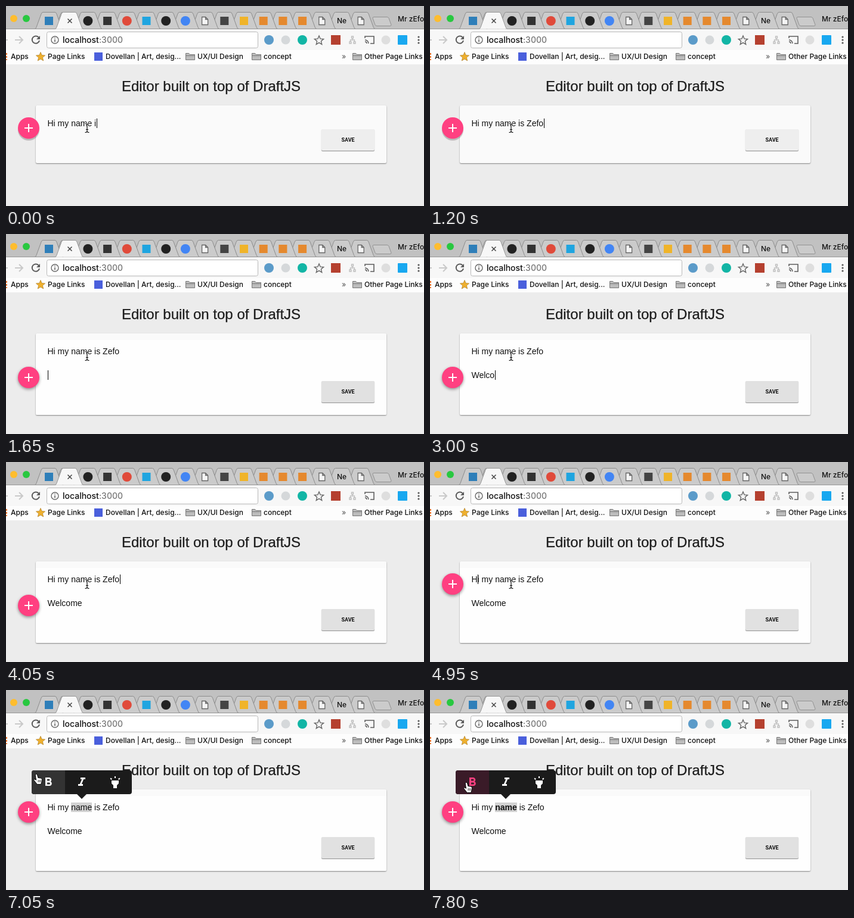
An HTML page that plays this animation: 701x336 px, repeating every 8000 ms.

```html
<!DOCTYPE html>
<html lang="en">
<head>
<meta charset="utf-8">
<title>Rich text editor demo</title>
<style>
  html, body { margin: 0; width: 100%; height: 100%; overflow: hidden; background: #ececec; }
  #stage { position: relative; width: 701px; height: 336px; overflow: hidden; background: #ececec; }
  #stage > * { position: absolute; }
  svg { left: 0; top: 0; width: 701px; height: 336px; }
  .ui { font: 500 12px Inter, "Open Sans", sans-serif; fill: #111; }
  .url { font-size: 14px; }
  .title {
    font: 24px "Liberation Sans", Arial, sans-serif; font-kerning: none;
    fill: #1c1c1c; stroke: #1c1c1c; stroke-width: .25px;
  }
  #card {
    left: 50px; top: 167px; width: 588px; height: 97px; border-radius: 2px; background: #fafafa;
    box-shadow: 0 1px 2px rgba(0,0,0,.45);
  }
  #save {
    position: absolute; right: 20px; bottom: 21px; width: 89px; height: 36px; border-radius: 2px;
    background: #eee; color: #111; text-align: center;
    font: 700 9px/36px Roboto, Arial, sans-serif;
    box-shadow: 0 1px 1px rgba(0,0,0,.45);
  }
  #card.tall { height: 137px; background: linear-gradient(#fafafa 11px, #fefefe 11px); }
  .tall #save { background: #e1e1e1; }
  .line {
    left: 69.5px; height: 20px; white-space: pre; color: #111; font-kerning: none;
    font: 14px/20px "Liberation Sans", Arial, sans-serif;
  }
  #first { top: 187px; }
  #second { top: 227px; }
  .selected { background: #d2d2d2; }
  .bold { font-weight: bold; }
  #caret { width: 1px; height: 16px; background: #000; }
  #fab {
    left: 20px; width: 36px; height: 36px; border-radius: 50%; background: #ff4081;
    box-shadow: 0 3px 1px rgba(0,0,0,.22);
  }
  .tall ~ #fab { box-shadow: 0 2px 5px rgba(0,0,0,.4); }
  #fab::before, #fab::after { content: ""; position: absolute; background: #fff; }
  #fab::before { left: 11px; top: 17px; width: 14px; height: 2px; }
  #fab::after { left: 17px; top: 11px; width: 2px; height: 14px; }
</style>
</head>
<body>
<div id="stage">
  <svg id="chrome" viewBox="0 0 701 336">
    <rect width="701" height="39" fill="#c1c1c1"/>
    <circle cx="13" cy="21" r="6" fill="#ffbd2e"/>
    <circle cx="34" cy="21" r="6" fill="#28c840"/>
    <g id="tabs" stroke="#8c8c8c"></g>
    <path d="M617 18.500h22q2 0 3 2l4 11q.5 2-2 2h-22q-2 0-3-2l-4-11q-.5-2 2-2z" fill="#cbcbcb" stroke="#929292"/>
    <rect y="39" width="701" height="35" fill="#f7f7f7"/>
    <rect y="74" width="701" height="24" fill="#fdfdfd"/>
    <path d="M0 38.500H84M126 38.500H701" stroke="#969696"/>
    <path id="active" stroke="#969696" fill="#f7f7f7"/>
    <path d="M103.500 21.500l7 7m0-7l-7 7" stroke="#444" stroke-width="1.500"/>
    <g id="icons"></g>
    <text class="ui" x="555" y="29">Ne</text>
    <text class="ui" x="657" y="26">Mr zEfo</text>

    <g fill="none" stroke="#c9c9c9" stroke-width="2">
      <path d="M0 57h3M15 57h13M22 51l6 6-6 6"/>
      <path d="M55 53a6.200 6.200 0 1 0 1 5" stroke="#5c5c5c"/>
    </g>
    <path d="M57 50v6h-6z" fill="#5c5c5c"/>
    <rect x="68.500" y="43.500" width="354" height="27" rx="3" fill="#fff" stroke="#b8b8b8"/>
    <circle cx="82" cy="57" r="6" fill="none" stroke="#666" stroke-width="1.400"/>
    <path d="M82 56v4.500M82 53v1.600" stroke="#666" stroke-width="1.600"/>
    <text class="ui url" x="95" y="62">localhost<tspan fill="#777">:3000</tspan></text>

    <circle cx="441" cy="57" r="8" fill="#5b9bc9"/>
    <circle cx="469" cy="57" r="7.500" fill="#d5d8da"/>
    <circle cx="497" cy="57" r="8" fill="#12b5a5"/>
    <path id="star" fill="none" stroke="#666" stroke-width="1.400"/>
    <rect x="545" y="49" width="16" height="16" fill="#b5402f"/>
    <g fill="none" stroke="#bdbdbd" stroke-width="1.300">
      <path d="M579.500 51h3v3h-3zM576 60h3v3h-3zM583 60h3v3h-3zM581 54v3M577.500 60v-3h7v3"/>
      <path d="M602 54v-3h15v12h-6M602 57a6 6 0 0 1 6 6M602 60a3 3 0 0 1 3 3" stroke="#5d5d5d" stroke-width="1.600"/>
    </g>
    <circle cx="637" cy="57" r="7.500" fill="#dedede"/>
    <rect x="657" y="49" width="16" height="16" rx="1" fill="#18a8f0"/>
    <g fill="#555"><circle cx="692" cy="52" r="1.600"/><circle cx="692" cy="57" r="1.600"/><circle cx="692" cy="62" r="1.600"/></g>

    <path d="M0 79h2v3H0zM0 84h2v3H0zM0 89h2v2H0z" fill="#ee7a35"/>
    <path id="gold" fill="#efb02e" stroke="#a97a25" stroke-width=".7"/>
    <rect x="148" y="78" width="14" height="14" fill="#4a5fdc"/>
    <g id="folders" fill="#bcbcbc" stroke="#777"></g>
    <g class="ui">
      <text x="8" y="89">Apps</text>
      <text x="70" y="89">Page Links</text>
      <text x="167" y="89">Dovellan | Art, desig...</text>
      <text x="321" y="89">UX/UI Design</text>
      <text x="432" y="89">concept</text>
      <text x="563" y="89" fill="#666">»</text>
      <text x="601" y="89">Other Page Links</text>
    </g>
    <text class="title" x="344" y="143" text-anchor="middle">Editor built on top of DraftJS</text>
  </svg>

  <div id="card"><div id="save">SAVE</div></div>
  <div class="line" id="first"><span></span><span id="word"></span><span></span></div>
  <div class="line" id="second"></div>
  <div id="caret"></div>
  <div id="fab"></div>

  <svg viewBox="0 0 701 336">
    <g id="toolbar">
      <path d="M47 135h160q4 0 4 4v32q0 4-4 4h-72l-8 8-8-8H47q-4 0-4-4v-32q0-4 4-4z" fill="#1b1b1b"/>
      <path id="button" d="M47 135h52v40H47q-4 0-4-4v-32q0-4 4-4z"/>
      <g fill="#fff" fill-rule="evenodd">
        <path id="b" transform="translate(59 143)" d="M15.600 10.790c.97-.67 1.650-1.770 1.650-2.790 0-2.260-1.750-4-4-4H7v14h7.040c2.090 0 3.710-1.700 3.710-3.790 0-1.520-.86-2.820-2.150-3.420zM10 6.500h3a1.500 1.500 0 0 1 0 3h-3zm3.500 9H10v-3h3.500a1.500 1.500 0 0 1 0 3z"/>
        <path transform="translate(115 143)" d="M10 4v3h2.210l-3.420 8H6v3h8v-3h-2.210l3.420-8H18V4z"/>
        <path transform="translate(171 143)" d="M6 14l3 3v5h6v-5l3-3V9H6zm5-12h2v3h-2zM3.500 5.900l1.400-1.400L7 6.600 5.600 8zm13.500.7l2.100-2.100 1.400 1.400L18.400 8z"/>
      </g>
    </g>
    <g id="beam" fill="none">
      <path d="M-3.500-7.500Q0-7.500 0-5V5Q0 7.500-3.500 7.500M3.500-7.500Q0-7.500 0-5M0 5Q0 7.500 3.500 7.500M-2 2.500h4" stroke="#fff" stroke-width="2.600" opacity=".8"/>
      <path d="M-3.500-7.500Q0-7.500 0-5V5Q0 7.500-3.500 7.500M3.500-7.500Q0-7.500 0-5M0 5Q0 7.500 3.500 7.500M-2 2.500h4" stroke="#111" stroke-width="1.200"/>
    </g>
    <g id="hand" stroke="#000" stroke-linejoin="round">
      <path d="M-1.700 1.500Q-2-.7-.4-.8T1.700 1l1.200 4.500 4.600.6q2 .4 2 2.500l-.6 4-1.200 3.800H1.200L-3.500 10.500q-1.800-2 0-2.600 1.600-.2 3 1.500z" fill="#fff"/>
      <path d="M3 9v4M5 9v4M7 9v4" stroke-width=".7"/>
    </g>
  </svg>
</div>

<script>
const $ = id => document.getElementById(id);

// Browser tabs
const tabX = i => 72 + 32.7 * i;
const tabPath = c =>
  `M${c - 24} 38.500q2 0 3-3l8-22q1-3 3-3H${c + 10}q2 0 3 3l8 22q1 3 3 3`;
for (let i = 16; i >= 0; i--) {
  $('tabs').innerHTML += `<path d="${tabPath(tabX(i))}" fill="#cbcbcb"/>`;
}
$('active').setAttribute('d', tabPath(106));

const dot = color => x => `<circle cx="${x}" cy="25" r="8" fill="${color}"/>`;
const box = color => x => `<rect x="${x - 7}" y="18" width="14" height="14" fill="${color}"/>`;
const sheet = x => `<path d="M${x - 5} 18.500h6l4 4v9h-10zM${x + 1} 18.500v4h4"
  fill="#f4f4f4" stroke="#666" stroke-width="1.300"/>`;
const none = () => '';
const orange = box('#e5892e');
const icons = [box('#2f7fb9'), none, dot('#222'), box('#333'), dot('#e04a3a'), box('#1fa5e0'),
  dot('#222'), dot('#4285f4'), sheet, box('#444'), box('#f0b429'), orange, orange, orange,
  sheet, none, sheet];
$('icons').innerHTML = icons.map((icon, i) => icon(tabX(i))).join('');

const starPath = (cx, cy, r) => 'M' + Array.from({ length: 10 }, (_, i) => {
  const a = Math.PI * (i / 5 - .5), d = i % 2 ? r * .45 : r;
  return `${cx + d * Math.cos(a)} ${cy + d * Math.sin(a)}`;
}).join('L') + 'z';
$('star').setAttribute('d', starPath(525, 58, 8));
$('gold').setAttribute('d', starPath(58, 85.500, 8));
$('folders').innerHTML = [301.500, 412.500, 581.500].map(x =>
  `<path d="M${x} 90.500v-11h5l2 2h8v9zM${x} 83.500h15"/>`).join('');

// Each entry changes part of the state and holds until the next one.
const steps = [
  [0, { first: 'Hi my name i', second: '', row: 0, at: 12, tall: false, fab: 187,
        selected: false, bold: false, hover: false, x: 136, y: 205, hand: false }],
  [150, { first: 'Hi my name is ', at: 14 }],
  [600, { first: 'Hi my name is Z', at: 15 }],
  [750, { first: 'Hi my name is Ze', at: 16 }],
  [900, { first: 'Hi my name is Zef', at: 17 }],
  [1200, { first: 'Hi my name is Zefo', at: 18 }],
  [1500, { tall: true, row: 1, at: 0 }],
  [1650, { fab: 223 }],
  [2250, { at: -1 }],
  [2400, { second: 'W', at: 1 }],
  [2700, { second: 'Wel', at: 3 }],
  [2850, { second: 'Welc', at: 4 }],
  [3000, { second: 'Welco', at: 5 }],
  [3150, { second: 'Welcom', at: 6 }],
  [3300, { second: 'Welcome', at: 7 }],
  [3450, { second: 'Welcome ', at: 8 }],
  [3900, { at: -1 }],
  [4050, { row: 0, at: 18 }],
  [4200, { fab: 187 }],
  [4500, { at: 0 }],
  [4950, { at: 1 }],
  [5250, { at: 2 }],
  [5400, { at: 3 }],
  [5550, { at: 4 }],
  [5700, { at: 5 }],
  [5850, { at: 6 }],
  [6150, { at: -1, selected: true }],
  [6600, { x: 133, y: 214 }],
  [6750, { x: 104, y: 190 }],
  [6900, { x: 62, y: 148, hand: true, hover: true }],
  [7050, { x: 51, y: 142 }],
  [7200, { x: 54, y: 147 }],
  [7350, { x: 59, y: 154 }],
  [7500, { x: 61, y: 156, bold: true }]
];

const pen = document.createElement('canvas').getContext('2d');
pen.font = '14px "Liberation Sans", Arial, sans-serif';
pen.fontKerning = 'none';

const show = (el, on) => { el.style.display = on ? '' : 'none'; };

function draw() {
  const now = performance.now() % 8000;
  const s = Object.assign({}, ...steps.filter(([t]) => t <= now).map(([, change]) => change));

  const [before, word, after] = $('first').children;
  before.textContent = s.first.slice(0, 6);
  word.textContent = s.first.slice(6, 10);
  after.textContent = s.first.slice(10);
  word.className = (s.selected ? 'selected ' : '') + (s.bold ? 'bold' : '');
  $('second').textContent = s.second;

  show($('caret'), s.at >= 0);
  if (s.at >= 0) {
    const typed = (s.row ? s.second : s.first).slice(0, s.at);
    $('caret').style.left = Math.round(70 + pen.measureText(typed).width) + 'px';
    $('caret').style.top = (s.row ? 229 : 189) + 'px';
  }

  $('card').className = s.tall ? 'tall' : '';
  $('fab').style.top = s.fab + 'px';

  show($('toolbar'), s.selected);
  $('button').setAttribute('fill', s.bold ? '#3a1b28' : s.hover ? '#333' : 'none');
  $('b').setAttribute('fill', s.bold ? '#ff4081' : '#fff');

  show($('beam'), !s.hand);
  show($('hand'), s.hand);
  $(s.hand ? 'hand' : 'beam').setAttribute('transform', `translate(${s.x} ${s.y})`);
  requestAnimationFrame(draw);
}
draw();
</script>
</body>
</html>
```
